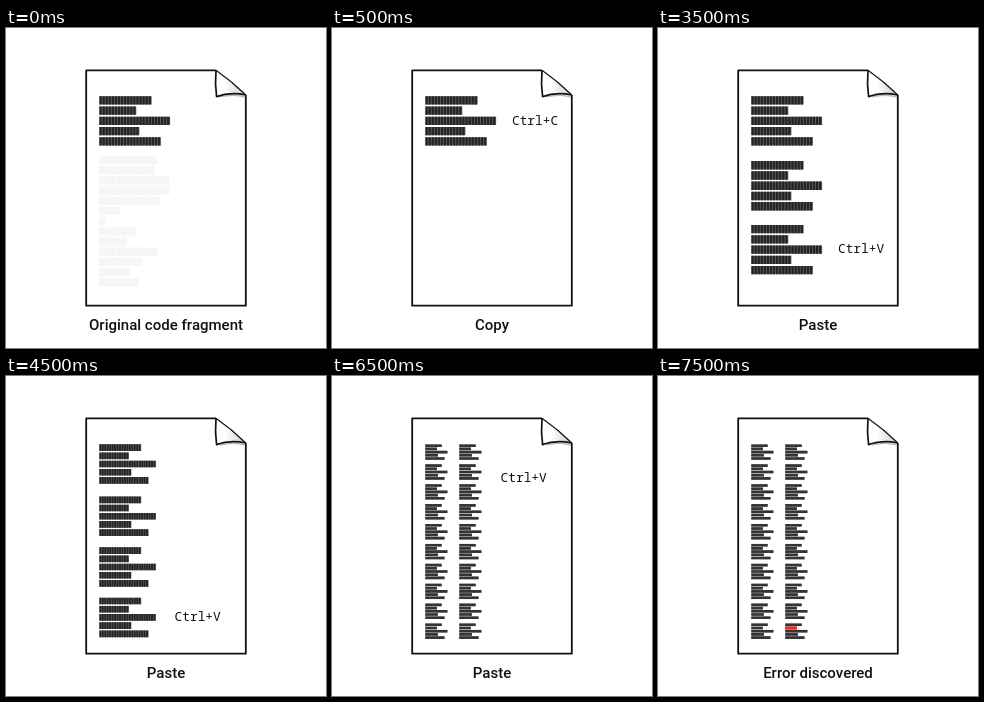
These frames come from a looping animation (320 by 320 pixels, 8000 ms). An HTML page:

```html
<!DOCTYPE html>
<html lang="en">
<head>
<meta charset="utf-8">
<title>Copy and paste</title>
<style>
html, body { margin: 0; width: 100%; height: 100%; overflow: hidden; background: #fff; }
svg { display: block; width: 100vw; height: 100vh; }
.caption { font: 500 15px Roboto, sans-serif; text-anchor: middle; fill: #111; }
.keys { font: 12.8px "Noto Sans Mono", monospace; fill: #111; }
</style>
</head>
<body>
<svg viewBox="0 0 320 320">
  <defs>
    <linearGradient id="curl" x1="0" y1="0" x2="1" y2="0">
      <stop offset="0.3" stop-color="#fff"/>
      <stop offset="1" stop-color="#ccc"/>
    </linearGradient>
  </defs>
  <g fill="none" stroke="#111" stroke-width="1.8" stroke-linejoin="round">
    <path d="M210 42.3H80.2V277.7H239.8V67"/>
    <path d="M214 68.8Q228 65.5 239 69" stroke="#bbb" stroke-width="1.6"/>
    <path d="M210 42.3Q208.8 56 210.6 68.6Q224 63.6 239.8 67" fill="url(#curl)" stroke-width="1.7"/>
    <path d="M210 42.3Q226 53.5 239.8 67" stroke-width="1.2"/>
  </g>
  <g id="scenes"></g>
</svg>
<script>
const NS = "http://www.w3.org/2000/svg";
const LOOP = 8000;
const LEFT = 93.4;
const CODE = [17, 12, 23, 13, 20];
const GHOST = [19, 18, 23, 23, 20, 7, 2, 12, 9, 19, 14, 10, 13];
const INK = ["#666", "#242424"];
const PALE = ["#fcfcfc", "#f4f4f4"];
const RED = ["#f22", "#f22"];

// Twenty small blocks in two columns
const grid = [LEFT, 127.4].flatMap(x =>
  Array.from({ length: 10 }, (_, i) => ({ x, y: 68.4 + i * 19.9 })));
const column = (...tops) => tops.map(y => ({ x: LEFT, y }));

const steps = [
  { at: 0, text: "Original code fragment", pitch: 10.25, blocks: column(68.3), ghost: true },
  { at: 500, text: "Copy", pitch: 10.25, blocks: column(68.3), keys: ["Ctrl+C", 180, 97.2] },
  { at: 2500, text: "Paste", pitch: 10.25, blocks: column(68.3, 133.1), keys: ["Ctrl+V", 180, 161.5] },
  { at: 3500, text: "Paste", pitch: 10.25, blocks: column(68.3, 133.1, 197), keys: ["Ctrl+V", 180, 225.3] },
  { at: 4500, text: "Paste", pitch: 8.2, blocks: column(68.3, 120.5, 171.3, 221.7), keys: ["Ctrl+V", 168.6, 244.7] },
  { at: 5500, text: "Paste", pitch: 6.4, blocks: column(68.3, 109, 148.8, 187.8, 228.7), keys: ["Ctrl+V", 168.6, 247] },
  { at: 6500, text: "Paste", pitch: 3.2, blocks: grid, keys: ["Ctrl+V", 168.6, 106.3] },
  { at: 7500, text: "Error discovered", pitch: 3.2, blocks: grid, error: true }
];

function add(parent, tag, attrs, text) {
  const el = document.createElementNS(NS, tag);
  for (const key in attrs) el.setAttribute(key, attrs[key]);
  if (text) el.textContent = text;
  return parent.appendChild(el);
}

// A line of code: a solid bar with darker character cells on top
function bar(parent, x, y, chars, pitch, [gap, cell]) {
  const w = pitch * 0.3;
  const h = pitch * 0.81;
  const line = { d: `M${x} ${y + h / 2}h${chars * w}`, "stroke-width": h, fill: "none" };
  add(parent, "path", { ...line, stroke: gap });
  add(parent, "path", { ...line, stroke: cell, "stroke-dasharray": `${w * 0.76} ${w * 0.24}` });
}

function lines(parent, rows, { x, y }, pitch, ink) {
  rows.forEach((n, i) => bar(parent, x, y + i * pitch, n, pitch, ink));
}

function build(step) {
  const g = add(document.getElementById("scenes"), "g", {});
  step.blocks.forEach(b => lines(g, CODE, b, step.pitch, INK));
  if (step.ghost) lines(g, GHOST, { x: LEFT, y: 127.8 }, 10.2, PALE);
  if (step.error) {
    const last = step.blocks[step.blocks.length - 1];
    bar(g, last.x, last.y + step.pitch, CODE[1], step.pitch, RED);
  }
  if (step.keys) {
    const [label, x, y] = step.keys;
    add(g, "text", { class: "keys", x, y }, label);
  }
  add(g, "text", { class: "caption", x: 160, y: 301.6 }, step.text);
  return g;
}

const scenes = steps.map(build);
const start = performance.now();

function draw(now) {
  const t = Math.max(0, now - start) % LOOP;
  const current = steps.filter(s => s.at <= t).length - 1;
  scenes.forEach((g, i) => g.setAttribute("display", i === current ? "inline" : "none"));
  requestAnimationFrame(draw);
}
draw(start);
</script>
</body>
</html>
```
